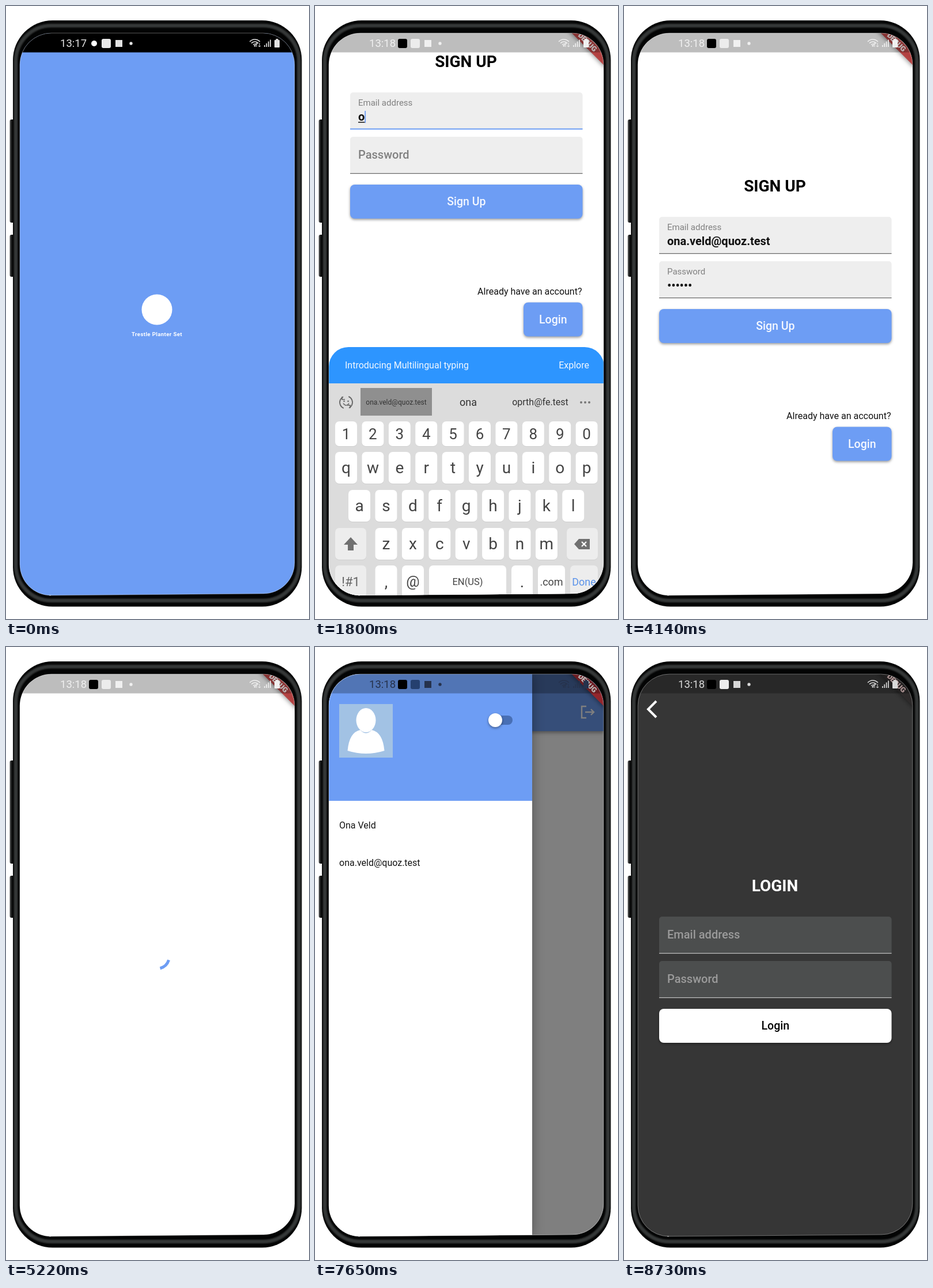
An HTML page with a canvas that plays this animation: 526 px wide and 1064 px high, repeating every 9720 ms.

```html
<!DOCTYPE html>
<html lang="en">
<head>
<meta charset="utf-8">
<title>App demo</title>
<style>
  html, body { margin: 0; width: 100%; height: 100%; overflow: hidden; background: #fff; }
  canvas { display: block; }
</style>
</head>
<body>
<canvas id="stage" width="526" height="1064"></canvas>
<script>
const ctx = document.getElementById('stage').getContext('2d');
const LOOP = 9720, STEP = 90;
const BLUE = [109, 157, 244], EMAIL = 'ona.veld@quoz.test';
let dark = 0;

const clamp = v => Math.max(0, Math.min(1, v));
const ramp = (t, from, to) => clamp((t - from) / (to - from));
const ease = p => p * p * (3 - 2 * p);
const gray = v => [v, v, v];
const css = c => `rgb(${c.join(',')})`;
// Blend of the light and the dark theme colour
const theme = (light, night) => css(light.map((v, i) => Math.round(v + (night[i] - v) * dark)));

const screenPath = new Path2D();
screenPath.moveTo(80, 47);
screenPath.arcTo(501, 47, 501, 110, 55);
screenPath.arcTo(501, 1020, 440, 1020, 54);
screenPath.lineTo(75, 1023);
screenPath.arcTo(24, 1023, 24, 960, 54);
screenPath.arcTo(24, 47, 80, 47, 55);
screenPath.closePath();

function box(x, y, w, h, fill, radius = 0) {
  ctx.fillStyle = fill;
  ctx.beginPath();
  ctx.roundRect(x, y, w, h, radius);
  ctx.fill();
}

function disc(x, y, r, fill) {
  ctx.fillStyle = fill;
  ctx.beginPath();
  ctx.arc(x, y, r, 0, 7);
  ctx.fill();
}

function arc(x, y, r, from, to, color, width) {
  ctx.strokeStyle = color;
  ctx.lineWidth = width;
  ctx.beginPath();
  ctx.arc(x, y, r, from, to);
  ctx.stroke();
}

// y is the middle of the capitals
function text(s, x, y, size, color, weight = 400, align = 'left') {
  ctx.font = `${weight} ${size}px Roboto, sans-serif`;
  ctx.textAlign = align;
  ctx.fillStyle = color;
  ctx.fillText(s, x, y + size * 0.335);
  return ctx.measureText(s).width;
}

function shape(d, x, y, color, width) {
  const path = new Path2D(d);
  ctx.save();
  ctx.translate(x, y);
  ctx.fillStyle = ctx.strokeStyle = color;
  ctx.lineWidth = width || 1;
  width ? ctx.stroke(path) : ctx.fill(path);
  ctx.restore();
}

function withShadow(blur, dy, alpha, draw) {
  ctx.save();
  ctx.shadowColor = `rgba(0,0,0,${alpha})`;
  ctx.shadowBlur = blur;
  ctx.shadowOffsetY = dy;
  draw();
  ctx.restore();
}

function phone() {
  ctx.fillStyle = '#fff';
  ctx.fillRect(0, 0, 526, 1064);
  const side = ctx.createLinearGradient(6.5, 0, 12, 0);
  side.addColorStop(0, '#5c5e5e');
  side.addColorStop(0.5, '#1c1d1d');
  side.addColorStop(1, '#000');
  box(6.5, 197, 8, 179, side, 3);
  box(6.5, 397, 8, 73, side, 3);
  box(12, 25, 501.5, 1017.5, '#030404', 69);
  // Narrowing strokes give the soft metal band
  for (const [width, color] of [[9, '#141515'], [6.5, '#262828'], [4, '#343737']]) {
    ctx.strokeStyle = color;
    ctx.lineWidth = width;
    ctx.beginPath();
    ctx.roundRect(17, 34, 491.5, 998, 62);
    ctx.stroke();
  }
}

function debugBanner() {
  ctx.save();
  ctx.translate(473, 63);
  ctx.rotate(Math.PI / 4);
  ctx.globalAlpha = 0.75;
  withShadow(7, 3, 0.5, () => box(-60, -8, 120, 16, theme([183, 34, 34], [50, 46, 46])));
  ctx.globalAlpha = 1;
  text('DEBUG', 0, 0, 12.5, theme(gray(255), [240, 205, 205]), 900, 'center');
  ctx.restore();
}

function statusBar(clock, ink, tile, appIcon) {
  text(clock, 94, 65, 18.5, ink);
  if (appIcon) box(144, 57, 16, 16, '#000', 3);
  else disc(153, 65, 5, '#fff');
  box(166, 57, 16, 16, tile, 3);
  box(190, 59, 12, 12, ink);
  disc(217, 65, 2.7, ink);
  for (const r of [4, 8, 12]) arc(432, 70, r, -2.4, -0.74, ink, 1.6);
  disc(432, 69, 1.6, ink);
  shape('M-2 5V-2M-4 0L-2-2L0 0M3-2V5M1 3L3 5L5 3', 437, 66, ink, 1);
  for (let i = 0; i < 4; i++) box(448 + i * 3.4, 68 - i * 3.2, 1.7, 3 + i * 3.2, ink);
  box(466, 59, 9, 13, ink, 1);
  box(468.5, 57, 4, 3, ink);
}

function field(y, label, value, focused) {
  const floating = focused || value;
  box(61, y, 403.5, 64, theme(gray(238), [76, 78, 78]), [5, 5, 0, 0]);
  box(61, y + (focused ? 62.5 : 63), 403.5, focused ? 2 : 1.2,
    focused ? css(BLUE) : theme(gray(105), gray(190)));
  text(label, 75, floating ? y + 18 : y + 31.5, floating ? 15 : 20, theme(gray(128), gray(155)), floating ? 400 : 500);
  const w = value ? text(value, 75, y + 42, 20, '#111', 700) : 0;
  if (focused) box(75 + w, y + 32, 1.8, 21, css(BLUE));
  return w;
}

function button(label, x, y, w) {
  withShadow(4, 2, 0.4, () => box(x, y, w, 59, theme(BLUE, gray(255)), 8));
  text(label, x + w / 2, y + 29.5, 19.5, theme([245, 248, 255], gray(0)), 500, 'center');
}

function form(title, action, y, email = '', password = '', focus = '') {
  text(title, 262, y + 0.5, 28, theme(gray(0), gray(255)), 700, 'center');
  const w = field(y + 54, 'Email address', email, focus === 'email');
  if (email.length === 1) box(75, y + 105, w, 1.5, '#111');
  field(y + 131, 'Password', password, focus === 'password');
  button(action, 61, y + 214, 403.5);
}

function signUp(t) {
  const scroll = 216 * (ease(ramp(t, 1080, 1350)) - ease(ramp(t, 3330, 3600)));
  const y = 312 - scroll;
  const late = t > 8000;
  const email = late || t < 1710 ? '' : t < 1890 ? EMAIL[0] : EMAIL;
  const dots = late ? 0 : Math.floor(6 * ramp(t, 2400, 3000));
  const focus = t >= 1000 && t < 2160 ? 'email' : t >= 2160 && t < 3150 ? 'password' : '';
  form('SIGN UP', 'Sign Up', y, email, '•'.repeat(dots), focus);
  text('Already have an account?', 463.5, y + 400, 16, theme(gray(17), gray(240)), 400, 'right');
  button('Login', 362, y + 418.5, 102.5);
}

function smiley(x, y, color) {
  disc(x, y, 10, color);
  disc(x - 3.5, y - 3, 1.6, '#dcdcdc');
  disc(x + 3.5, y - 3, 1.6, '#dcdcdc');
  arc(x, y + 1, 5, 0.2, 2.94, '#dcdcdc', 2);
}

function cycleArrows(x, y) {
  arc(x, y, 11, 0.4 - Math.PI / 2, 1.1, '#666', 1.8);
  arc(x, y, 11, 0.4 + Math.PI / 2, 1.1 + Math.PI, '#666', 1.8);
  shape('M2 5H7V10M-2-5H-7V-10', x, y, '#666', 1.6);
}

function toolIcons(xs, y, micColor, gearDot) {
  const dim = '#bdbdbd';
  smiley(xs[0], y, dim);
  shape('M-10-10H11V3L4 10H-10Z', xs[1], y, dim);
  disc(xs[1] - 4, y - 3, 1.5, '#dcdcdc');
  disc(xs[1] + 4, y - 3, 1.5, '#dcdcdc');
  arc(xs[1], y, 5, 0.2, 2.94, '#dcdcdc', 1.8);
  box(xs[2] - 11, y - 10, 22, 20, dim, 3);
  text('GIF', xs[2], y, 10, '#dcdcdc', 700, 'center');
  box(xs[3] - 3.5, y - 12, 7, 14, micColor, 3.5);
  arc(xs[3], y - 2, 7.5, 0, Math.PI, micColor, 2);
  shape('M0 6V11', xs[3], y, micColor, 2);
  arc(xs[4], y, 6.5, 0, 7, '#666', 5.5);
  ctx.setLineDash([4.4, 6]);
  arc(xs[4], y, 10, 0, 6.28, '#666', 3);
  ctx.setLineDash([]);
  disc(xs[4] + gearDot, y - 10, 3, '#ee7d1e');
  disc(481, y - 11, 3, '#ee7d1e');
}

function toolbar(t, y) {
  if (t >= 2160) {
    toolIcons([66, 152, 238, 323, 409], y, '#bdbdbd', 9);
  } else if (t >= 1710 && t < 1980) {
    cycleArrows(54, y);
    disc(50.5, y - 2, 1.3, '#666');
    disc(57.5, y - 2, 1.3, '#666');
    arc(54, y, 5, 0.3, 2.84, '#666', 1.5);
    if (t >= 1800 && t < 1890) box(79, y - 25, 124, 48, '#8f8f8f');
    text(EMAIL, 141, y, 12, '#333', 400, 'center');
    text('ona', 266, y, 18, '#333', 400, 'center');
    text('oprth@fe.test', 391, y, 16, '#333', 400, 'center');
  } else {
    cycleArrows(54, y);
    text('T', 54, y, 13, '#555', 500, 'center');
    box(78, y - 11, 1, 22, '#c4c4c4');
    toolIcons([116, 190, 265, 339, 413], y, '#777', 10);
  }
  for (const x of [462, 469, 476]) disc(x, y, 2, '#777');
}

function key(x, y, w, h, label = '', size = 28, special = false, color = '#444') {
  box(x, y + 1, w, h, '#cfcfcf', 7);
  box(x, y, w, h, special ? '#ededed' : '#fff', 7);
  text(label, x + w / 2, y + h / 2 + 0.5, size, color, 400, 'center');
}

function keyboard(t) {
  const hidden = (1 - ramp(t, 990, 1170)) ** 3;
  const password = t >= 2160;
  const top = 592 + 200 * hidden + (password ? 2 : 0) + 440 * ease(ramp(t, 3300, 3570));
  ctx.save();
  ctx.globalAlpha = 1 - 0.65 * hidden;
  box(24, top, 478, 70, '#2d95ff', [34, 34, 0, 0]);
  text('Introducing Multilingual typing', 52, top + 31.5, 16, '#f2f8ff');
  text('Explore', 476, top + 31.5, 16, '#f2f8ff', 400, 'right');
  box(24, top + 63, 478, 440, '#dcdcdc');
  toolbar(t, top + 96);

  const row = (letters, x, y, h, size) =>
    [...letters].forEach((c, i) => key(x + i * 46.4, top + y, 38, h, c, size));
  row('1234567890', 35, 129, 43, 26);
  row('qwertyuiop', 35, 182, 55, 28);
  row('asdfghjkl', 58, 248, 55, 28);
  row('zxcvbnm', 104.5, 314, 55, 28);

  key(35, top + 314, 54, 55, '', 0, true);
  shape('M0-12L12 1H5V11H-5V1H-12Z', 62, top + 342, '#707070');
  key(437, top + 314, 54, 55, '', 0, true);
  shape('M-14 0L-6-9H13V9H-6Z', 464, top + 342, '#707070');
  shape('M0-4L8 4M8-4L0 4', 463, top + 342, '#fff', 2.2);

  const last = top + 379;
  key(35, last, 54, 56, '!#1', 22, true, '#666');
  key(104.5, last, 38, 56, ',');
  if (password) {
    key(151, last, 224, 56, 'English (US)', 16.5);
    key(384, last, 37, 56, '.');
    key(430, last, 61, 56, 'Done', 18, true, '#5b93ea');
  } else {
    key(151, last, 38, 56, '@', 26);
    key(198, last, 134, 56, 'EN(US)', 16.5);
    key(341, last, 37, 56, '.');
    key(387, last, 47, 56, '.com', 18);
    key(443, last, 48, 56, 'Done', 18, true, '#5b93ea');
  }
  ctx.restore();
}

function spinner(t) {
  const p = (((t - 5220) / 1333 + 0.17) % 1 + 1) % 1;
  const head = ease(clamp(p * 2)), tail = ease(clamp(p * 2 - 1));
  const start = 0.3 + tail * 4.7 + (t - 5220) / 2222 * 2 * Math.PI;
  arc(262, 537, 21.5, start, start + 0.1 + (head - tail) * 3.4, css(BLUE), 5);
}

function drawer(open) {
  if (!open) return;
  ctx.fillStyle = `rgba(0,0,0,${0.5 * open})`;
  ctx.fillRect(24, 47, 478, 976);
  ctx.save();
  ctx.translate(-353 * (1 - open), 0);
  withShadow(20, 0, 0.35, () => box(24, 47, 353, 976, theme(gray(255), gray(54))));
  box(24, 47, 353, 220, theme(BLUE, gray(34)));
  box(42, 99, 93, 93, '#a2c2e4');
  ctx.fillStyle = '#fff';
  ctx.beginPath();
  ctx.ellipse(88.5, 127, 17, 21, 0, 0, 7);
  ctx.fill();
  shape('M-10-7Q0 4 10-7Q29-3 32 29Q0 39-32 29Q-29-3-10-7Z', 88.5, 151, '#fff');
  box(306, 119, 37, 16, theme([72, 111, 181], gray(130)), 8);
  withShadow(4, 2, 0.4, () => disc(313 + 23 * dark, 127, 12, '#fff'));
  const ink = theme(gray(20), gray(245));
  text('Ona Veld', 42, 310, 16, ink);
  text(EMAIL, 42, 375, 16, ink);
  ctx.restore();
}

function home(t) {
  withShadow(6, 3, 0.35, () => box(24, 47, 478, 99, theme(BLUE, gray(34))));
  shape('M-2-10H-10V10H-2M-4 0H10M6-5L11 0L6 5', 473, 113, '#fff', 2.4);
  drawer(ease(ramp(t, 5580, 5850)) - ease(ramp(t, 7920, 8100)));
}

function splash() {
  box(24, 47, 478, 976, css(BLUE));
  disc(262, 527, 26.5, '#fff');
  ctx.letterSpacing = '0.4px';
  text('Trestle Planter Set', 262, 570, 9.6, '#fff', 700, 'center');
  ctx.letterSpacing = '0px';
  box(24, 47, 478, 33.5, '#000');
  statusBar('13:17', '#e2e2e2', '#e8e8e8', false);
}

function app(t) {
  dark = ramp(t, 7650, 7830);
  const atHome = t >= 5310 && t < 8280;
  box(24, 47, 478, 976, theme(gray(255), gray(54)));
  if (t < 4500 || (t >= 8280 && t < 8730)) signUp(t);
  else if (t < 5310) spinner(t);
  else if (atHome) home(t);
  else {
    form('LOGIN', 'Login', 414);
    shape('M7-14L-7 0L7 14', 49, 108, '#fff', 4);
  }
  if (t >= 990 && t < 3600) keyboard(t);
  debugBanner();
  box(24, 47, 478, 33.5, 'rgba(0,0,0,.26)');
  const darkInk = atHome && dark < 0.5;
  statusBar('13:18', darkInk ? '#26324c' : dark ? '#d8d8d8' : '#f0f0f0', darkInk ? '#25406f' : '#ececec', true);
}

function frame() {
  const now = performance.now() % LOOP;
  const t = Math.floor(now / STEP) * STEP;
  phone();
  ctx.save();
  ctx.clip(screenPath);
  t < 540 ? splash() : app(t);
  ctx.restore();
  ctx.strokeStyle = 'rgba(255,255,255,.35)';
  ctx.lineWidth = 1;
  ctx.stroke(screenPath);
  requestAnimationFrame(frame);
}
frame();
</script>
</body>
</html>
```
